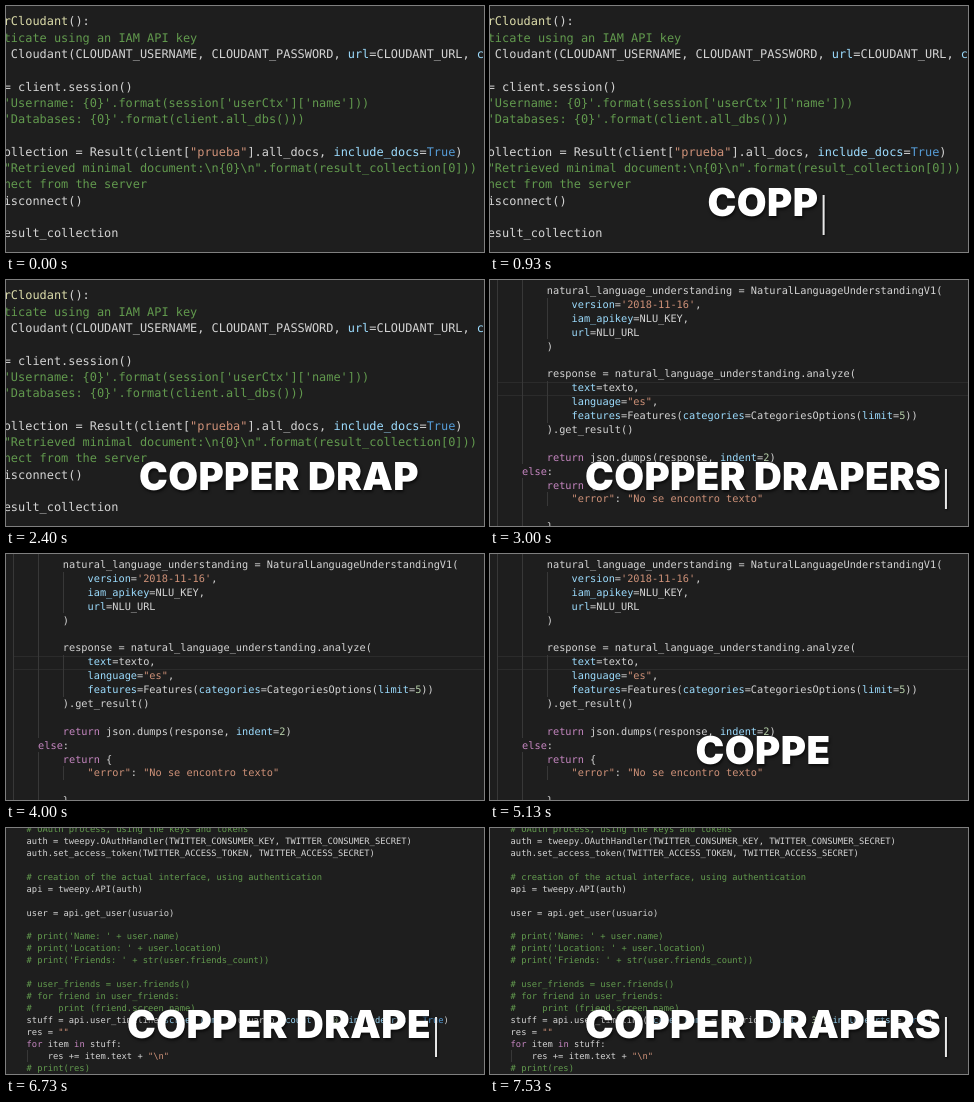
An HTML page for the animation above (8000 ms loop, 478 px wide and 246 px high).

```html
<!DOCTYPE html>
<html lang="en">
<head>
<meta charset="utf-8">
<title>Code with typed title</title>
<style>
  html, body { margin: 0; width: 100%; height: 100%; overflow: hidden; background: #1e1e1e; }
  #stage { position: relative; width: 478px; height: 246px; overflow: hidden; background: #1e1e1e; }
  .scene { position: absolute; inset: 0; visibility: hidden; }
  .scene.on { visibility: visible; }
  .line, .rule { position: absolute; white-space: pre; }
  .line { color: #d4d4d4; font-family: "DejaVu Sans Mono", monospace; text-rendering: geometricPrecision; }
  .rule { background: #383838; }
  .comment { color: #629a4e; }
  .string { color: #ce9178; }
  .keyword { color: #c586c0; }
  .constant { color: #569cd6; }
  .param { color: #9cdcfe; }
  .name { color: #dcdcaa; }
  .number { color: #b5cea8; }
  #title {
    position: absolute; left: 273px; top: 177px; transform: translateX(-50%);
    font: 900 38.5px/40px Inter, sans-serif; font-optical-sizing: none; letter-spacing: .4px;
    color: #fff; white-space: pre;
    text-rendering: geometricPrecision; text-shadow: 1px 2px 3px rgba(0, 0, 0, .65);
  }
  #caret {
    position: absolute; left: calc(100% + 4px); top: 12px; width: 2px; height: 40px;
    background: #e8e8e8; box-shadow: 1px 1px 2px rgba(0, 0, 0, .6);
  }
</style>
</head>
<body>
<div id="stage"></div>
<script>
// A leading ~ marks a line whose comment sign is out of view.
const scenes = [
  { x: -2.3, y: 15.5, pitch: 16.3, advance: 7.18, rules: [], code: String.raw`rCloudant():
~ticate using an IAM API key
 Cloudant(CLOUDANT_USERNAME, CLOUDANT_PASSWORD, url=CLOUDANT_URL, connect=True)

= client.session()
~'Username: {0}'.format(session['userCtx']['name']))
~'Databases: {0}'.format(client.all_dbs()))

ollection = Result(client["prueba"].all_docs, include_docs=True)
~"Retrieved minimal document:\n{0}\n".format(result_collection[0]))
~nect from the server
isconnect()

esult_collection` },

  { x: 32.1, y: 11.9, pitch: 13.9, advance: 6.185,
    rules: [[7, 0, 1, 246], [32, 0, 1, 184], [32, 198, 1, 48], [57, 18, 1, 41], [57, 101, 1, 42],
            [57, 212, 1, 14], [8, 102, 470, 1], [8, 115, 470, 1]],
    code: String.raw`    natural_language_understanding = NaturalLanguageUnderstandingV1(
        version='2018-11-16',
        iam_apikey=NLU_KEY,
        url=NLU_URL
    )

    response = natural_language_understanding.analyze(
        text=texto,
        language="es",
        features=Features(categories=CategoriesOptions(limit=5))
    ).get_result()

    return json.dumps(response, indent=2)
else:
    return {
        "error": "No se encontro texto"

    }` },

  { x: 20.6, y: 3, pitch: 11.93, advance: 5.285, rules: [[21, 222, 1, 12]],
    code: String.raw`# OAuth process, using the keys and tokens
auth = tweepy.OAuthHandler(TWITTER_CONSUMER_KEY, TWITTER_CONSUMER_SECRET)
auth.set_access_token(TWITTER_ACCESS_TOKEN, TWITTER_ACCESS_SECRET)

# creation of the actual interface, using authentication
api = tweepy.API(auth)

user = api.get_user(usuario)

# print('Name: ' + user.name)
# print('Location: ' + user.location)
# print('Friends: ' + str(user.friends_count))

# user_friends = user.friends()
# for friend in user_friends:
#     print (friend.screen_name)
stuff = api.user_timeline(screen_name = usuario, count = 30, include_rts = True)
res = ""
for item in stuff:
    res += item.text + "\n"
# print(res)` }
];

const token = new RegExp([
  /(?<comment>^[#~].*)/, /(?<string>"[^"]*"|'[^']*')/, /(?<keyword>\b(?:return|else|for|in)\b)/,
  /(?<constant>\bTrue\b)/, /(?<param>\b(?:screen_name|count|include_rts)\b|\b\w+(?==))/,
  /(?<name>\brCloudant\b)/, /(?<number>\b\d+\b)/
].map(part => part.source).join('|'), 'g');

const stage = document.getElementById('stage');

function add(parent, className, style = {}) {
  const node = document.createElement('div');
  node.className = className;
  Object.assign(node.style, style);
  return parent.appendChild(node);
}

function highlight(line) {
  return line.replace(token, (...args) => {
    const kind = Object.entries(args.at(-1)).find(([, text]) => text !== undefined)[0];
    return `<span class="${kind}">${args[0].replace(/^~/, '')}</span>`;
  });
}

const views = scenes.map(({ x, y, pitch, advance, rules, code }) => {
  const view = add(stage, 'scene');
  for (const [left, top, width, height] of rules) {
    add(view, 'rule', { left: left + 'px', top: top + 'px', width: width + 'px', height: height + 'px',
                        opacity: width > 1 ? .5 : 1 });
  }
  code.split('\n').forEach((line, row) => {
    add(view, 'line', {
      left: x + 'px', top: y + (row - .5) * pitch + 'px',
      fontSize: advance / .602 + 'px', lineHeight: pitch + 'px'
    }).innerHTML = highlight(line);
  });
  return view;
});

const title = add(stage, '');
title.id = 'title';
const typed = title.appendChild(document.createElement('span'));
const caret = add(title, '');
caret.id = 'caret';

// All times are in ticks of 1/15 s; the title restarts every 60 ticks.
const words = 'COPPER DRAPERS';
const keyTicks = [4, 7, 10, 13, 16, 20, 23, 26, 29, 32, 36, 39, 42, 45];
const cuts = [45, 90];
const passed = (ticks, now) => ticks.filter(tick => tick <= now).length;
const start = performance.now();

function draw() {
  const time = (performance.now() - start) % 8000;
  const tick = Math.floor((time + 5) * .015) % 120;
  const beat = tick % 60;
  const current = passed(cuts, tick);
  views.forEach((view, i) => view.classList.toggle('on', i === current));
  typed.textContent = words.slice(0, passed(keyTicks, beat));
  caret.style.visibility = beat >= 8 && (beat - 8) % 15 < 8 ? 'visible' : 'hidden';
  requestAnimationFrame(draw);
}
draw();
</script>
</body>
</html>
```
